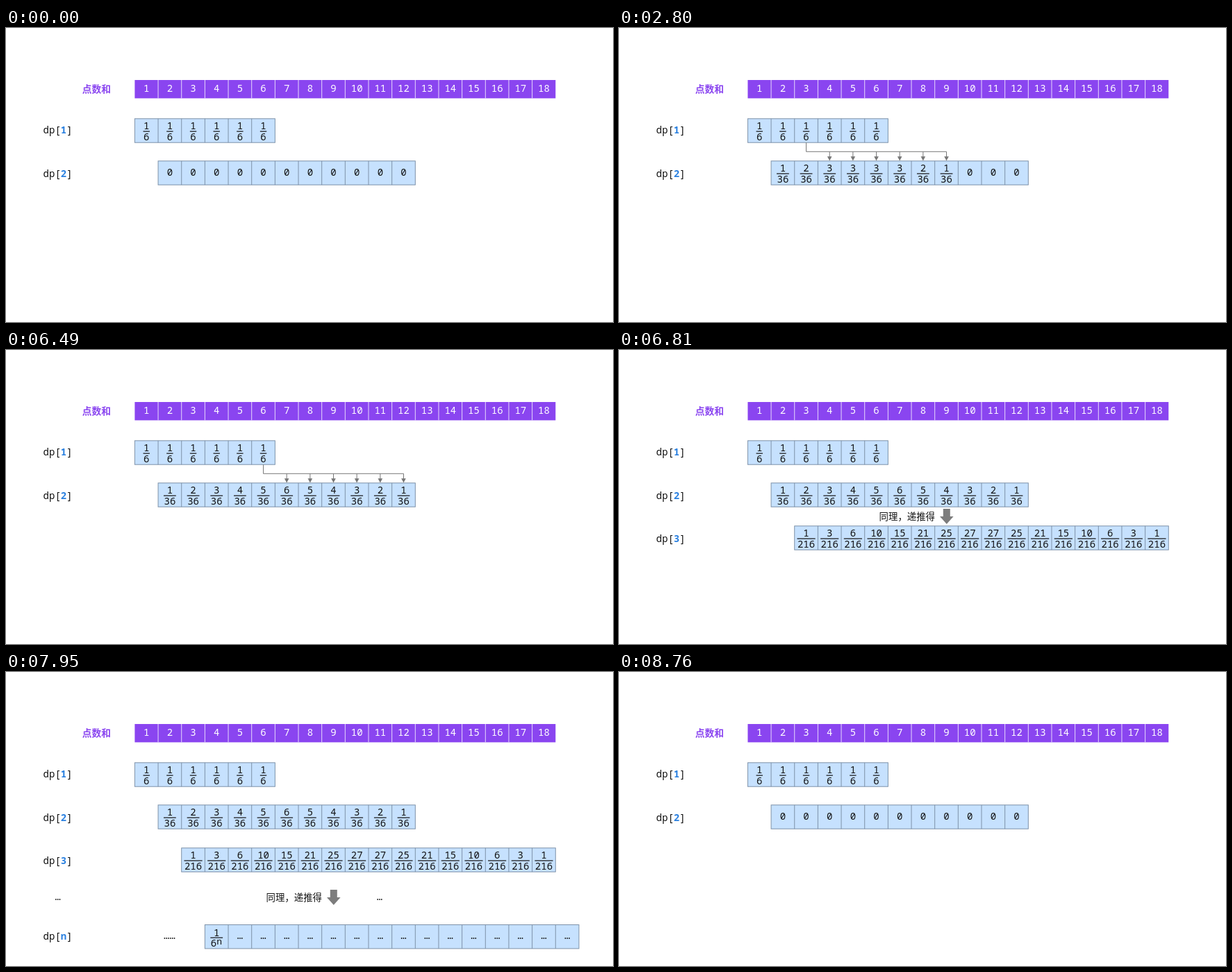
These frames come from a looping animation (874x424 px, 9.04 s). An HTML page with a canvas:

```html
<!DOCTYPE html>
<html lang="zh-CN">
<head>
<meta charset="utf-8">
<title>dp</title>
<style>
html, body { margin: 0; width: 100%; height: 100%; overflow: hidden; background: #fff; }
canvas { display: block; }
</style>
</head>
<body>
<canvas id="stage" width="874" height="424"></canvas>
<script>
const ctx = document.getElementById('stage').getContext('2d');
const LOOP = 9040;
const STEPS = [690, 1700, 2800, 3810, 4820, 5840]; // one source die each
const ROW3 = 6810, ROW_N = 7780, RESET = 8720;
const LEFT = 185.4, PITCH = 33.66, ROW_H = 34.4;
const PURPLE = '#8a45f0', FILL = '#c6e1fe', EDGE = '#7e92a8', INK = '#111', BLUE = '#2a80e0', GREY = '#777';
const MONO = '"Noto Sans Mono", "DejaVu Sans Mono", monospace';
const CJK = '"Noto Sans CJK SC", "Noto Sans CJK", sans-serif';

const cellX = n => LEFT + PITCH * (n - 1);
const midX = n => cellX(n) + PITCH / 2;

function text(s, x, y, { color = INK, weight = 500, size = 14, family = MONO, align = 'center' } = {}) {
  ctx.font = `${weight} ${size}px ${family}`;
  ctx.fillStyle = color;
  ctx.textAlign = align;
  ctx.fillText(s, x, y);
}

function line(points, color, width = 1) {
  ctx.strokeStyle = color;
  ctx.lineWidth = width;
  ctx.beginPath();
  points.forEach(([x, y]) => ctx.lineTo(x, y));
  ctx.stroke();
}

function polygon(points, color) {
  ctx.fillStyle = color;
  ctx.beginPath();
  points.forEach(([x, y]) => ctx.lineTo(x, y));
  ctx.fill();
}

function header() {
  text('点数和', 109.8, 92.6, { color: PURPLE, weight: 700, size: 13.7, family: CJK, align: 'left' });
  ctx.fillStyle = PURPLE;
  ctx.fillRect(LEFT, 75, PITCH * 18, 26.4);
  for (let n = 1; n <= 18; n++) {
    if (n > 1) line([[cellX(n), 75], [cellX(n), 101.4]], '#e6d8fc');
    text(n, midX(n), 92.4, { color: '#fff' });
  }
}

function label(key, y) {
  text('dp[', 53.6, y, { align: 'left' });
  text(key, 83, y, { color: BLUE, weight: 700 });
  text(']', 87.2, y, { align: 'left' });
}

function row(first, last, top) {
  const x = cellX(first), w = cellX(last + 1) - x;
  ctx.fillStyle = FILL;
  ctx.fillRect(x, top, w, ROW_H);
  ctx.strokeStyle = EDGE;
  ctx.lineWidth = 1;
  ctx.strokeRect(x, top, w, ROW_H);
  for (let n = first + 1; n <= last; n++) line([[cellX(n), top], [cellX(n), top + ROW_H]], EDGE);
}

function bar(x, y, chars) {
  const half = (chars * 8.4 + 1) / 2;
  line([[x - half, y], [x + half, y]], INK, 1.2);
}

function fraction(num, den, n, top, bottomY = 30.8) {
  const x = midX(n);
  text(num, x, top + 15.6);
  bar(x, top + 18.3, den.length);
  text(den, x, top + bottomY);
}

// Ways to reach each sum after adding the first `dice` faces of one more die
function convolve(prev, faces = 6) {
  const out = {};
  for (let f = 1; f <= faces; f++)
    for (const s in prev) out[+s + f] = (out[+s + f] || 0) + prev[s];
  return out;
}
const ONE = { 1: 1, 2: 1, 3: 1, 4: 1, 5: 1, 6: 1 };
const THREE = convolve(convolve(ONE));

function branches(src) {
  line([[midX(src), 165.4], [midX(src), 178.3], [midX(src + 6), 178.3]], GREY);
  for (let n = src + 1; n <= src + 6; n++) {
    const x = midX(n);
    line([[x, 178.3], [x, 186]], GREY);
    polygon([[x - 3.3, 185.2], [x + 3.3, 185.2], [x, 191.6]], GREY);
  }
}

function deduce(y) {
  text('同理，递推得', 374.6, y + 4.8, { size: 13.4, weight: 500, family: CJK, align: 'left' });
  const x = 471.8;
  polygon([[x - 5, y - 11], [x + 5, y - 11], [x + 5, y], [x + 9.8, y], [x, y + 11],
    [x - 9.8, y], [x - 5, y]], '#7d7d7d');
}

function lastRow() {
  text('…', 74.6, 329);
  text('…', 538, 329);
  label('n', 386);
  text('……', 235.4, 385.3);
  const top = 364.5, x = midX(4);
  row(4, 19, top);
  text('1', x, top + 16);
  bar(x, top + 18.7, 2);
  text('6', x - 4.2, top + 31.3);
  text('n', x + 4, top + 28.2, { size: 13 });
  for (let n = 5; n <= 19; n++) text('…', midX(n), 385.3);
}

function draw(t) {
  const step = t >= RESET ? 0 : STEPS.filter(s => t >= s).length;
  const showThree = t >= ROW3 && t < RESET;
  const showN = t >= ROW_N && t < RESET;
  ctx.fillStyle = '#fff';
  ctx.fillRect(0, 0, 874, 424);
  header();

  label('1', 152);
  row(1, 6, 130.8);
  for (let n = 1; n <= 6; n++) fraction(1, '6', n, 130.8);

  label('2', 215);
  row(2, 12, 191.8);
  const two = convolve(ONE, step);
  for (let n = 2; n <= 12; n++) {
    if (two[n]) fraction(two[n], '36', n, 191.8);
    else text('0', midX(n), 213.4);
  }
  if (step && !showThree) branches(step);

  if (showThree) {
    label('3', 277.4);
    row(3, 18, 253.8);
    for (let n = 3; n <= 18; n++) fraction(THREE[n], '216', n, 253.8);
    deduce(showN ? 325 : 240);
  }
  if (showN) lastRow();
}

function tick() {
  draw(performance.now() % LOOP);
  requestAnimationFrame(tick);
}
tick();
</script>
</body>
</html>
```
